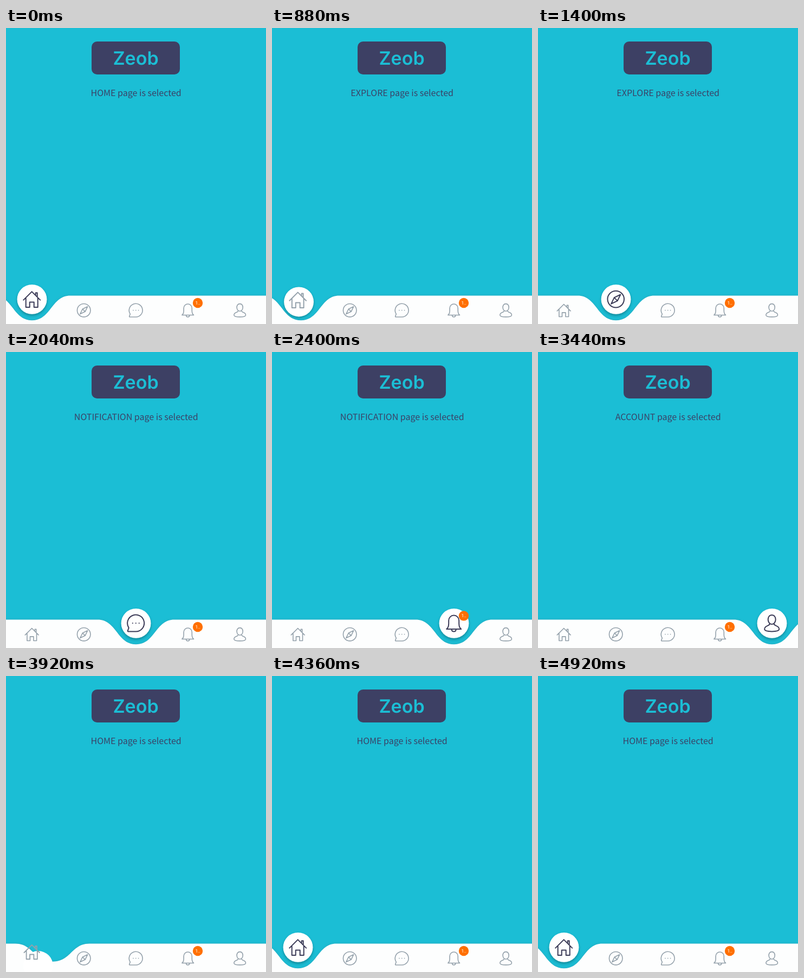
These frames come from a looping animation (480x548 px, 5 s). An HTML page:

```html
<!DOCTYPE html>
<html lang="en">
<head>
<meta charset="utf-8">
<title>Bottom navigation</title>
<style>
  html, body { margin: 0; width: 100%; height: 100%; overflow: hidden; background: #1bbed5; }
  svg { display: block; width: 480px; height: 548px; }
  text { text-rendering: geometricPrecision; text-anchor: middle; }
  .plate { fill: #3d4064; }
  .brand { font: 600 34px Inter, sans-serif; fill: #1bbed5; }
  .label { font: 16px "Noto Sans CJK SC", "Noto Sans CJK JP", "Noto Sans", sans-serif; fill: #3b4166; }
  .bar { fill: #fdfefe; filter: drop-shadow(0 0 2px rgba(80, 105, 115, .25)); }
  .disc { fill: #fff; }
  .icon { fill: none; stroke: #94a1ab; stroke-width: 2; stroke-linecap: round; stroke-linejoin: round; }
  .icon.on { stroke: #3b3b57; }
  .badge circle { fill: #ff6f00; }
  .badge text { font: 8.5px Roboto, sans-serif; fill: #fff; }
</style>
</head>
<body>
<svg viewBox="0 0 480 548">
  <rect width="480" height="548" fill="#1bbed5"/>
  <rect class="plate" x="158" y="25" width="163" height="61" rx="10"/>
  <text class="brand" x="239.5" y="68">Zeob</text>
  <text class="label" x="240.2" y="126.4"></text>
  <path class="bar"/>
  <g id="cells"></g>
</svg>
<script>
const LOOP = 5000, STEP = 40;
const DP = 480 / 420;                 // px per layout unit
const TOP = 495.5 - 24 * DP;          // top of the navigation view
const HEIGHT = 72 * DP;
const DISC_Y = TOP + 30 * DP;

const pages = [
  { name: 'HOME', icon: 'M-15.5 1.5L0-14L15.5 1.5M-11-2V14.8H-4V5.3H4V14.8H11V-2M7-8V-11.8H10V-5' },
  { name: 'EXPLORE', icon: 'M15.3 0A15.3 15.3 0 1 1-15.3 0A15.3 15.3 0 1 1 15.3 0M8.6-8.6L3 3L-8.6 8.6L-3-3ZM-3-3L3 3' },
  { name: 'MESSAGE', icon: 'M0 15.5A15.5 15.5 0 1 0-13 8.5L-15 14Q-15.3 15.5-13.5 15.5ZM-6 0h.1M0 0h.1M6 0h.1' },
  { name: 'NOTIFICATION', icon: 'M-13.5 11Q-9.5 8-9.5 1V-5A9.5 9.5 0 0 1 9.5-5V1Q9.5 8 13.5 11ZM-4 11.5C-4 16.8 4 16.8 4 11.5', badge: '1..' },
  { name: 'ACCOUNT', icon: 'M0-15C10-15 8.5 2 0 2C-8.5 2-10-15 0-15ZM-4 1C-4 6-13.5 3.5-13.5 11C-13.5 14-7 15.3 0 15.3C7 15.3 13.5 14 13.5 11C13.5 3.5 4 6 4 1' }
];

// Each tap: start time, page left, page entered
const taps = [[845, 0, 1], [1440, 1, 2], [2040, 2, 3], [2788, 3, 4], [3570, 4, 0]]
  .map(([at, from, to]) => ({ at, from, to, span: Math.abs(to - from) * 100 + 150 }));

const centre = i => 48 + 96 * i;
const mix = (a, b, p) => a + (b - a) * p;

// cubic-bezier(.4, 0, .2, 1)
function ease(x) {
  if (x <= 0) return 0;
  if (x >= 1) return 1;
  let lo = 0, hi = 1, u;
  for (let i = 0; i < 24; i++) {
    u = (lo + hi) / 2;
    const v = 1 - u;
    if (1.2 * u * v * v + .6 * u * u * v + u * u * u < x) lo = u; else hi = u;
  }
  return u * u * (3 - 2 * u);
}

function add(parent, tag, attrs, text = '') {
  const el = document.createElementNS('http://www.w3.org/2000/svg', tag);
  for (const key in attrs) el.setAttribute(key, attrs[key]);
  el.textContent = text;
  return parent.appendChild(el);
}

const label = document.querySelector('.label');
const bar = document.querySelector('.bar');
const root = document.querySelector('#cells');

const cells = pages.map((page, i) => {
  const cell = {
    x: centre(i),
    side: i ? -1 : 1,
    enter: taps.find(tap => tap.to === i),
    leave: taps.find(tap => tap.from === i),
    disc: add(root, 'circle', { class: 'disc', r: 24 * DP }),
    icon: add(root, 'path', { class: 'icon', d: page.icon })
  };
  if (page.badge) {
    cell.badge = add(root, 'g', { class: 'badge' });
    add(cell.badge, 'circle', { r: 9.2 });
    add(cell.badge, 'text', { y: 3 }, page.badge);
  }
  return cell;
});

function drawBar(x, wave) {
  // wave: 0 is the full dip, 1 the small bump of a long jump
  const y = v => TOP + v * DP;
  const edge = y(24), ctrl = y(mix(24, 16, wave)), low = y(mix(64, 8, wave));
  const q = 31 * DP, h = 62 * DP;
  bar.setAttribute('d', `M-99 ${edge}H${x - h}C${x - q} ${ctrl} ${x - q} ${low} ${x} ${low}` +
    `C${x + q} ${low} ${x + q} ${ctrl} ${x + h} ${edge}H580V600H-99Z`);
}

function drawCell(cell, i, t) {
  const { enter, leave } = cell;
  const p = (i ? 0 : 1)
    + ease((t - enter.at - enter.span / 4) / enter.span)
    - ease((t - leave.at) / 250);
  const drop = (1 - p) * 18 * DP;
  cell.disc.setAttribute('cx', cell.x + cell.side * (1 - p) * 24 * DP);
  cell.disc.setAttribute('cy', DISC_Y + (1 - p) * HEIGHT);
  cell.disc.style.filter = p > .7 ? `drop-shadow(0 ${3 * p}px ${2.5 * p}px rgba(0, 0, 0, .27))` : 'none';
  cell.icon.setAttribute('transform', `translate(${cell.x - .3} ${502.1 + drop}) scale(${.8 + .2 * p})`);
  cell.icon.classList.toggle('on', p > .9999);
  if (cell.badge) cell.badge.setAttribute('transform', `translate(${cell.x + 18} ${488.4 + drop})`);
}

function draw(t) {
  const tap = taps.filter(s => s.at <= t).pop();
  let x = centre(0), wave = 0, page = 0;
  if (tap) {
    const f = ease((t - tap.at) / tap.span);
    x = mix(centre(tap.from), centre(tap.to), f);
    if (Math.abs(tap.to - tap.from) > 1) wave = 1 - Math.abs(2 * f - 1);
    page = tap.to;
  }
  label.textContent = pages[page].name + ' page is selected';
  drawBar(x, wave);
  cells.forEach((cell, i) => drawCell(cell, i, t));
}

const start = performance.now();
function tick() {
  const t = performance.now() - start + 8;
  draw(Math.floor(t / STEP) * STEP % LOOP);
  requestAnimationFrame(tick);
}
tick();
</script>
</body>
</html>
```
